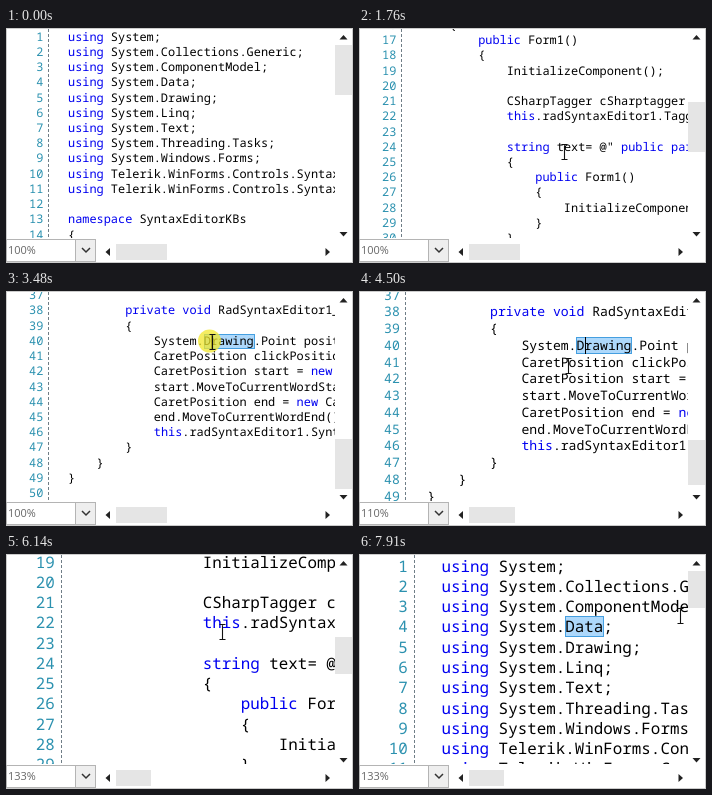
Animation, 347 px wide and 235 px high, one loop 7.99 s. Source, as an HTML page:

```html
<!DOCTYPE html>
<html lang="en">
<head>
<meta charset="utf-8">
<title>Syntax editor</title>
<style>
html, body { margin: 0; width: 100%; height: 100%; overflow: hidden; background: #fff; }
#stage { position: relative; width: 347px; height: 235px; overflow: hidden; background: #fff; }
#stage * { box-sizing: border-box; }
#view { position: absolute; left: 1px; top: 1px; width: 328px; height: 209px; overflow: hidden; }
#page { position: absolute; left: -1px; top: 0; }
pre {
  position: absolute; top: 0; margin: 0;
  font-family: "Noto Sans Mono", "DejaVu Sans Mono", monospace;
  font-size: inherit; line-height: inherit; text-rendering: geometricPrecision;
}
#nums { left: 0; text-align: right; color: #2b91af; }
#code { color: #000; }
#code b { font-weight: normal; color: #0000f0; }
#sel { position: absolute; background: #add8fb; border: 1px solid #459fe0; }
#caret { position: absolute; width: 1px; background: #000; }
#ui { position: absolute; left: 0; top: 0; }
#ui text { font: 11px "Open Sans", "Noto Sans", sans-serif; fill: #666; }
</style>
</head>
<body>
<div id="stage">
  <div id="view">
    <div id="page">
      <div id="sel"></div>
      <pre id="nums"></pre>
      <pre id="code"></pre>
      <div id="caret"></div>
    </div>
  </div>
  <svg id="ui" width="347" height="235" viewBox="0 0 347 235">
    <line id="margin" y1="1" y2="210" stroke="#6f7d86" stroke-dasharray="3 2"/>
    <rect id="track" x="329" y="1" width="17" height="210" fill="#f3f3f3"/>
    <rect id="vthumb" x="329" width="17"/>
    <rect id="hthumb" x="110" y="216" height="16" fill="#e5e5e5"/>
    <rect x=".5" y=".5" width="346" height="234" fill="none" stroke="#ccc"/>
    <rect x=".5" y="211.5" width="89" height="22" fill="#fff" stroke="#b4b4b4"/>
    <rect x="69.5" y="211.5" width="20" height="22" fill="#eee" stroke="#b4b4b4"/>
    <path d="M76 220l4 4 4-4" fill="none" stroke="#333" stroke-width="1.5"/>
    <text id="zoom" x="2" y="226"></text>
    <path d="M333.500 11.500h8l-4-4.500zM333.500 204h8l-4 4.500zM104 220v8l-4.500-4zM319.500 220v8l4.500-4z" fill="#222"/>
    <circle id="click" r="11.500" fill="#f2e72c" fill-opacity=".75"/>
    <path id="beam" d="M-3-7.500h2.500l.5.500.5-.500h2.500M0-7v14M-3 7.500h2.500l.5-.500.5.500h2.500" fill="none" stroke="#111" stroke-width="1.100"/>
    <path id="arrow" d="M0 0v15l3.500-3.300 2.500 5.600 2.300-1-2.400-5.400h4.800z" fill="#fff" stroke="#000"/>
  </svg>
</div>
<script>
const LOOP = 7990, FONT = 11.917, ROW = 15.22, COL = 7.15;
const TICK = 78, BLINK = 460, VIEW = 209, TRACK = 181;
const $ = id => document.getElementById(id);

const lines = `using System;
using System.Collections.Generic;
using System.ComponentModel;
using System.Data;
using System.Drawing;
using System.Linq;
using System.Text;
using System.Threading.Tasks;
using System.Windows.Forms;
using Telerik.WinForms.Controls.SyntaxEditor.Taggers;
using Telerik.WinForms.Controls.SyntaxEditor.UI;

namespace SyntaxEditorKBs
{
    public partial class Form1 : Form
    {
        public Form1()
        {
            InitializeComponent();

            CSharpTagger cSharptagger = new CSharpTagger();
            this.radSyntaxEditor1.TaggersRegistry.Register();

            string text= @" public partial class Form1
            {
                public Form1()
                {
                    InitializeComponent();
                }
            }
            ";

            this.radSyntaxEditor1.Load(text);

        }


        private void RadSyntaxEditor1_Click()
        {
            System.Drawing.Point position = new Point();
            CaretPosition clickPosition = start;
            CaretPosition start = new CaretPosition();
            start.MoveToCurrentWordStart();
            CaretPosition end = new CaretPosition();
            end.MoveToCurrentWordEnd();
            this.radSyntaxEditor1.SyntaxEditor.Select();
        }
    }
}
`.split("\n");

const keywords = /\b(using|namespace|public|private|partial|class|void|this|string|new)\b/g;
$("code").innerHTML = lines.map(s => s.replace(keywords, "<b>$1</b>")).join("\n");
$("nums").textContent = lines.map((s, i) => i + 1).join("\n");

// pointer path: from, until, x, y, downward bend
const moves = [
  [360, 670, 180, 74], [1200, 1680, 205, 124], [2140, 2610, 209, 82],
  [2850, 3250, 206, 51], [3630, 4020, 209, 75], [5420, 5420, 210, 71],
  [5740, 5970, 216, 78], [6370, 6370, 211, 69], [6750, 6980, 215, 100],
  [7530, 7910, 342, 27, 45]
];
// double clicks: time, line, word, caret offset inside the word
const picks = [
  [1130, 5, "Drawing", 4], [2780, 42, "CaretPosition", 9], [3480, 40, "Drawing", 1],
  [5660, 40, "System", 2], [6600, 4, "Data", 0]
];
const zoomTimes = [4500, 4880, 4960];

const show = (id, on) => { $(id).style.display = on ? "" : "none"; };
const set = (id, attrs) => { for (const k in attrs) $(id).setAttribute(k, attrs[k]); };
const place = (id, x, y) => set(id, { transform: `translate(${x} ${y})` });
const px = (id, box) => { for (const k in box) $(id).style[k] = box[k] + "px"; };

function pointer(t) {
  let x = 281, y = 241;
  for (const [from, until, tx, ty, bend = 0] of moves) {
    if (t < from) break;
    const steps = Math.round((until - from) / TICK) + 1;
    const p = Math.min(1, (Math.floor((t - from + 8) / TICK) + 1) / steps);
    x += (tx - x) * p;
    y += (ty - y) * p + bend * Math.sin(Math.PI * p);
  }
  return [Math.round(x), Math.round(y)];
}

function scroll(t, z) {
  if (t < 1440 || t >= 6200) return 0;
  if (t < 1840) return 48 * (Math.floor((t - 1440) / 80) + 1);
  return (560 * z - 7.6) * (t < 6140 ? 1 : 0.5);
}

function drawSelection(t, z, row) {
  const pick = picks.filter(p => p[0] <= t).pop();
  show("sel", pick);
  show("caret", pick);
  show("click", pick && t < pick[0] + 110);
  if (!pick) return;
  const [start, line, word, offset] = pick;
  const col = COL * z, top = (line - 1) * row;
  const left = 62 * z + lines[line - 1].indexOf(word) * col;
  px("sel", { left: left - 0.3, top, width: word.length * col + 1, height: row });
  px("caret", { left: Math.round(left + offset * col), top, height: row });
  const since = Math.max(start, ...zoomTimes.filter(s => s <= t));
  show("caret", offset && Math.floor((t - since) / BLINK) % 2 === 0);
}

function draw(t) {
  const z = 1.1 ** zoomTimes.filter(s => s <= t).length;
  const row = ROW * z, total = row * lines.length, offset = scroll(t, z);
  px("page", { top: 0.7 - offset, fontSize: FONT * z, lineHeight: row });
  px("nums", { width: 37.3 + 35 * (z - 1) });
  px("code", { left: 62 * z });
  const edge = Math.round(42 + 39 * (z - 1)) + 0.5;
  set("margin", { x1: edge, x2: edge });
  $("zoom").textContent = Math.round(z * 100) + "%";
  drawSelection(t, z, row);

  const [x, y] = pointer(t), overBar = x > 329;
  show("beam", t >= 360 && !overBar);
  show("arrow", overBar);
  place("beam", x + 0.5, y);
  place("arrow", x + 0.5, y + 0.5);
  place("click", x - 2.5, y - 1);

  show("track", overBar);
  set("vthumb", {
    y: Math.round(17 + TRACK * offset / total),
    height: Math.round(TRACK * VIEW / total),
    fill: overBar ? "#cdcdcd" : "#e5e5e5"
  });
  set("hthumb", { width: Math.round(51 - 48 * (z - 1)) });
}

const begin = performance.now();
function tick() {
  draw((performance.now() - begin) % LOOP);
  requestAnimationFrame(tick);
}
tick();
</script>
</body>
</html>
```
